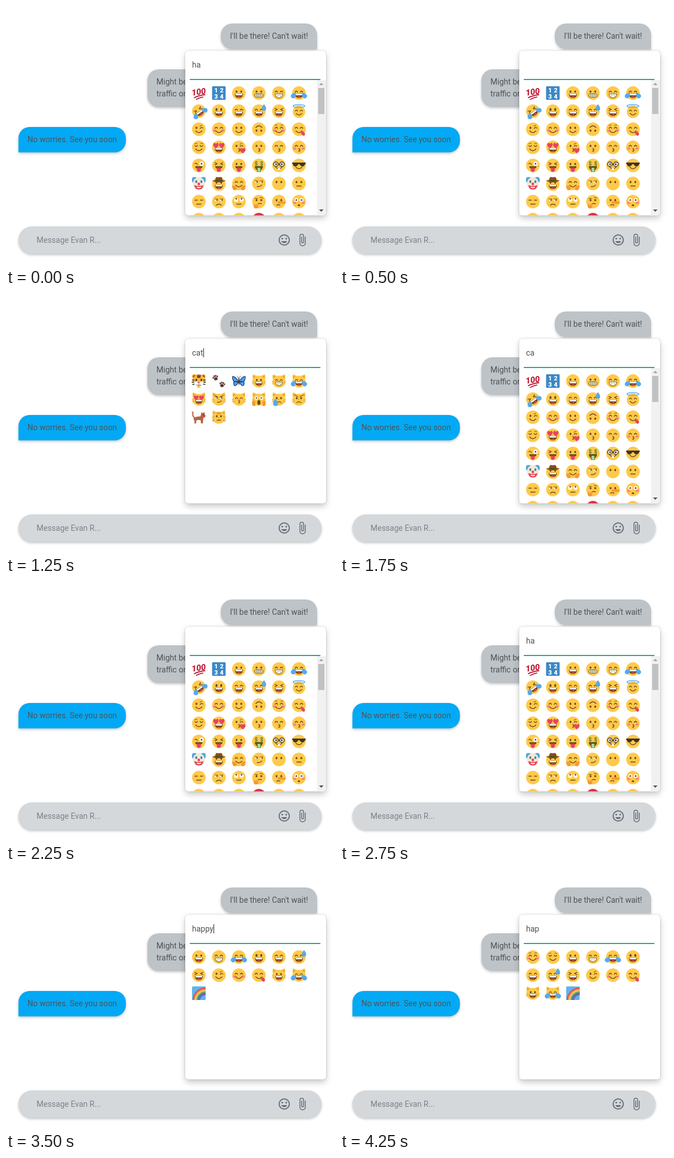
An HTML page that plays this animation: 580 by 460 pixels, repeating every 4500 ms.

```html
<!DOCTYPE html>
<html lang="en">
<head>
<meta charset="utf-8">
<title>Emoji search</title>
<style>
html, body { margin: 0; width: 100%; height: 100%; overflow: hidden; background: #fff; }
svg { display: block; width: 580px; height: 460px; font: 14px Roboto, sans-serif; }
.bubble { filter: drop-shadow(0 2px 2px rgba(0,0,0,.24)); }
.panel { filter: drop-shadow(0 5px 6px rgba(0,0,0,.19)) drop-shadow(0 0 1px rgba(0,0,0,.22)); }
</style>
</head>
<body>
<svg viewBox="0 0 580 460">
  <defs>
    <clipPath id="list"><path d="M317 131H566V365a5.500 5.500 0 0 1-5.500 5.500H322.500a5.500 5.500 0 0 1-5.500-5.500z"/></clipPath>
    <clipPath id="tile"><rect x="-12" y="-12" width="24" height="24" rx="1.500"/></clipPath>
    <clipPath id="disc"><circle r="12"/></clipPath>
  </defs>
  <g fill="#bdc3c7">
    <path class="bubble" d="M400 31H530a20 20 0 0 1 20 20V76H400a20 20 0 0 1-20-20V51a20 20 0 0 1 20-20z"/>
    <path class="bubble" d="M270 112H530a20 20 0 0 1 20 20V178.500H270a20 20 0 0 1-20-20V132a20 20 0 0 1 20-20z"/>
    <path class="bubble" fill="#03a9f4" d="M42 214H192a20 20 0 0 1 20 20V239a20 20 0 0 1-20 20H22V234a20 20 0 0 1 20-20z"/>
    <rect class="bubble" x="22" y="390" width="536" height="48.500" rx="24.250" fill="#d4d8db"/>
  </g>
  <g fill="#505356">
    <text x="396" y="58">I'll be there! Can't wait!</text>
    <text x="266" y="139">Might be</text>
    <text x="266" y="160">traffic on</text>
    <text x="38" y="241">No worries. See you soon</text>
    <text x="54" y="419" fill="#7e8286">Message Evan R...</text>
  </g>
  <g fill="#69707a">
    <circle cx="492" cy="414" r="9" fill="none" stroke="#69707a" stroke-width="2"/>
    <circle cx="488.500" cy="411.500" r="1.500"/>
    <circle cx="495.500" cy="411.500" r="1.500"/>
    <path d="M486.900 416h10.200c-.8 2.040-2.780 3.500-5.100 3.500s-4.300-1.460-5.100-3.500z"/>
    <path transform="translate(512 402)" fill="none" stroke="#69707a" stroke-width="1.500"
      d="M17.250 6V17.500a4.750 4.750 0 0 1-9.500 0V5a3.250 3.250 0 0 1 6.500 0V15.500a1.750 1.750 0 0 1-3.500 0V6"/>
  </g>
  <rect class="panel" x="317" y="79" width="249" height="291.500" rx="5.500" fill="#fff"/>
  <path d="M325 130H556" stroke="#26a69a" stroke-width="2"/>
  <text id="query" x="329" y="109" fill="#505050"></text>
  <path id="caret" stroke="#222" d="M0 96V112"/>
  <g id="results" clip-path="url(#list)"></g>
  <g id="bar" clip-path="url(#list)">
    <path fill="#f1f1f1" d="M550 131h16V371h-16z"/>
    <path fill="#c1c1c1" d="M552 145h11V191h-11z"/>
    <path fill="#a3a3a3" d="M553.500 140h8l-4-4z"/>
    <path fill="#505050" d="M553.500 360h8l-4 4z"/>
  </g>
</svg>
<script>
const YEL = '#ffc94a', BRN = '#6b4a17', RED = '#e8455f', PINK = '#ff7f87',
      BLUE = '#55a9ee', ORG = '#f39a2d', WHT = '#fff', DARK = '#3b3430';

// Drawing helpers; every emoji is centred on 0,0 with radius 12.
const fill = (d, c = BRN) => `<path d="${d}" fill="${c}"/>`;
const line = (d, c = BRN, w = 1.4) =>
  `<path d="${d}" fill="none" stroke="${c}" stroke-width="${w}" stroke-linecap="round" stroke-linejoin="round"/>`;
const oval = (x, y, rx, ry = rx, c = BRN) => `<ellipse cx="${x}" cy="${y}" rx="${rx}" ry="${ry}" fill="${c}"/>`;
const pair = (x, y, rx, ry, c) => oval(-x, y, rx, ry, c) + oval(x, y, rx, ry, c);
const move = (t, s) => `<g transform="${t}">${s}</g>`;
const mirror = s => s + move('scale(-1 1)', s);
const heart = (x, y, k, c = RED) =>
  move(`translate(${x} ${y}) scale(${k})`, fill('M0 4C-6 0-4-4-2-4Q-.5-4 0-2.500Q.5-4 2-4C4-4 6 0 0 4z', c));
const drop = (x, y, r, k = 1) =>
  move(`translate(${x} ${y}) rotate(${r}) scale(${k})`, fill('M0-5C2-2 3.500 0 3.500 2a3.500 3.500 0 0 1-7 0C-3.500 0-2-2 0-5z', BLUE));
const label = (x, y, size, s, c, extra = '') =>
  `<text x="${x}" y="${y}" font-size="${size}" font-weight="900" text-anchor="middle" fill="${c}" ${extra}>${s}</text>`;

const eyes = {
  dot: pair(4.2, -2.5, 1.6, 2.1),
  arc: mirror(line('M2.300-1.500Q4.600-5.500 6.900-1.500')),
  shut: mirror(line('M2.300-3Q4.600 0 6.900-3')),
  squint: mirror(line('M7-4.800L3-2.800L7-.8')),
  flat: mirror(line('M2.500-2.500H7')),
  wink: oval(-4.2, -2.5, 1.6, 2.1) + line('M2.300-1.500Q4.600-4.500 7-2') + line('M2-5.500L5.500-7', BRN, 1),
  heart: heart(-5.2, -3, 1.2) + heart(5.2, -3, 1.2),
  side: pair(4.5, -2.5, 2.6, 1.7, WHT) + oval(-3.3, -2.4, 1.3) + oval(5.7, -2.4, 1.3) + mirror(line('M2-4.500H7', BRN, 1.1)),
  wide: pair(4.7, -2.8, 3.3, 3.3, WHT) + pair(4.7, -2.8, 1.5, 1.5)
};
const open = fill('M-7.200 1.200H7.200C7.200 6 4 9 0 9S-7.200 6-7.200 1.200z');
const teeth = fill('M-6.300 1.500H6.300L5.600 4H-5.600z', WHT);
const mouth = {
  open: open + teeth + oval(0, 7.300, 3.300, 1.500, RED),
  teeth: open + fill('M-6.200 2H6.200C6 5.500 3.500 8 0 8S-6 5.500-6.200 2z', WHT) + line('M-6 4.700H6M-3 2V7M0 2V8M3 2V7', '#b8a98e', .5),
  smile: line('M-5.500 3Q0 9 5.500 3'),
  grimace: '<rect x="-7.500" y="1.500" width="15" height="5.600" rx="2.300" fill="#fff" stroke="#6b4a17"/>' + line('M-7 4.300H7M-3.500 2V7M0 2V7M3.500 2V7', BRN, .6),
  kiss: line('M-1 2C3 2 2 4.500 0 4.500C3 4.500 2 7.500-1 7', BRN, 1.2),
  flat: line('M-4 4.500H4'),
  smirk: line('M-3 5.500Q3 6 5 2.500'),
  frown: line('M-4.500 6.500Q0 2.500 4.500 6.500'),
  tongue: fill('M-6.500 1.500H6.500Q6 6.500 0 6.500T-6.500 1.500z') + fill('M-3.500 4H3.500V8a3.500 3.500 0 0 1-7 0z', RED) + line('M0 5V7.500', '#b92c48', .7)
};
const blush = pair(7.5, 2.3, 2.8, 2, PINK);
const tears = drop(-8.8, 3.5, 38, 1.15) + drop(8.8, 3.5, -38, 1.15);
const face = (e, m, extra = '', under = '') => oval(0, 0, 12, 12, YEL) + under + (eyes[e] || '') + (mouth[m] || '') + extra;

const whiskers = mirror(line('M8.500 2L12 1M8.500 4.500L12 5', '#d98e24', .7));
const cat = (e, m, extra = '') =>
  mirror(fill('M3-9L10.500-12Q12.500-6 10-2z', YEL) + fill('M6-8L9.700-9.800Q10.500-7 9.500-4.500z', '#e59a31')) +
  oval(0, 1, 11.6, 10.6, YEL) + whiskers + move('translate(0 .5) scale(.9)', (eyes[e] || '') + (mouth[m] || '')) +
  fill('M-1.400.2H1.400L0 1.700z', '#d2695c') + extra;
const paw = oval(0, 2, 3, 2.6, '#5b3331') + pair(1.4, -2.7, 1.2, 1.8, '#5b3331') + pair(3.7, -.9, 1.1, 1.6, '#5b3331');

const art = {
  hundred: move('rotate(-8)', label(0, 3, 15, '100', '#c2203c', 'font-style="italic" textLength="0"'.slice(0, 19)) +
    line('M-9 7Q0 4 10 4.500M-6 10.500Q0 8 6 8', '#c2203c', 1.9)),
  digits: '<rect x="-12" y="-12" width="24" height="24" rx="1.500" fill="#3b88c6"/>' +
    label(-5, -1.5, 11, 1, WHT) + label(5, -1.5, 11, 2, WHT) + label(-5, 9.5, 11, 3, WHT) + label(5, 9.5, 11, 4, WHT),
  grinning: face('dot', 'open'),
  grimacing: face('dot', 'grimace'),
  grin: face('arc', 'teeth'),
  joy: face('arc', 'open', tears),
  rofl: move('rotate(-35)', face('squint', 'open', tears)),
  smiley: face('dot', 'open', pair(4.2, -3, 1.7, 2.5)),
  smile: face('arc', 'open'),
  sweat: face('arc', 'open', drop(9, -7, 0, 1.1)),
  laughing: face('squint', 'open'),
  angel: move('translate(0 1.300) scale(.92)', face('arc', 'smile')) +
    `<ellipse cy="-9" rx="10.500" ry="2.300" fill="none" stroke="${BLUE}" stroke-width="1.500"/>`,
  wink: face('wink', 'smile'),
  blush: face('arc', 'smile', '', blush),
  slight: face('dot', 'smile'),
  upside: move('rotate(180)', face('dot', 'smile')),
  relaxed: face('arc', 'smile', mirror(line('M3-7Q5-8.500 7-7', BRN, .9)), blush),
  yum: face('arc', 'smile', fill('M3 6.500L7 3.500Q12 7 10.500 10T5.500 10z', RED)),
  relieved: face('shut', 'smile', mirror(line('M3-6.500Q5-8 7-6.500', BRN, .9))),
  hearts: face('heart', 'open'),
  kissHeart: face('wink', 'kiss', heart(7, 6, 1.2)),
  kissing: face('dot', 'kiss'),
  kissSmile: face('arc', 'kiss'),
  kissShut: face('arc', 'kiss', '', blush),
  winkTongue: face('', 'tongue', line('M-7-3Q-4.500-5-2.300-1.500') + oval(4.8, -3, 3.7, 3.7, WHT) + oval(4.8, -3, 1.6)),
  shutTongue: face('squint', 'tongue'),
  tongue: face('dot', 'tongue'),
  money: face('', '', open + fill('M-3.500 4H3.500V11.500H-3.500z', '#56a844') + label(0, 10, 7, '$', WHT) +
    label(-4.8, 0, 9, '$', '#37803a') + label(4.8, 0, 9, '$', '#37803a')),
  nerd: face('', 'smile', fill('M-2 5H2V8H-2z', WHT) + mirror(`<circle cx="5.300" cy="-2" r="4" fill="#fff" stroke="${DARK}" stroke-width="1.500"/>`) +
    pair(5, -2, 1.6, 1.9) + line('M-1.300-2H1.300', DARK)),
  cool: face('', 'smile', fill('M-12-5H12V-3L10.500-2C10 3 3 3 1.500-2H-1.500C-3 3-10 3-10.500-2L-12-3z', DARK)),
  clown: mirror(fill('M4-11Q12-13 12-8Q13-2 9-1z', '#4aa6de')) + oval(0, .5, 10.5, 11.5, '#f8e5d4') +
    pair(4.5, -3.5, 2, 2.8, '#75c6e8') + pair(4.5, -3, 1.2, 1.7) + oval(0, .8, 2.4, 2.4, RED) +
    fill('M-8 3Q0 6 8 3Q7 10.500 0 10.500T-8 3z', '#d9354f') + fill('M-5 5.500Q0 7 5 5.500Q3 8.500 0 8.500T-5 5.500z', WHT),
  cowboy: move('translate(0 1)', face('dot', 'open')) + fill('M-12-6Q-7-4-6-7Q-6-12-3-11.500Q0-10.500 3-11.500Q6-12 6-7Q7-4 12-6Q10-2 0-2T-12-6z', '#805025') +
    line('M-6-5.500Q0-4 6-5.500', '#4e2d18', 1.1),
  hug: face('arc', 'smile') + mirror(fill('M4 11Q3 7 5.500 6L7 3.500Q9 3 8.800 5L11 3Q13 4 11.500 7Q11 12 7 12z', ORG)),
  smirk: face('side', 'smirk'),
  mute: face('dot', ''),
  neutral: face('dot', 'flat'),
  blank: face('flat', 'flat'),
  unamused: face('side', 'frown'),
  roll: face('', 'flat', pair(4.7, -3, 3.5, 3.5, WHT) + pair(4.7, -5, 1.5, 1.5)),
  think: face('dot', '', line('M-1.500 4Q2 2.500 4.500 4') + line('M2-7Q5-8.500 7-6M-7-5.500H-2.500', BRN, 1) +
    fill('M-9 4L-7 6L0 3.500Q2 4.500 0 5.500L-3 7Q0 8-1 10Q-3 13-7 12Q-10 11-9 4z', ORG)),
  lie: face('dot', '', line('M-4 6.500Q-1 4.500 2 6.500') + fill('M-1-.5Q6-1 11 .3Q13 2 11 3.500Q5 4-1 3.500Q-3 1.500-1-.5z', ORG)),
  flushed: face('wide', '', oval(0, 6.5, 2.3, 1.5), blush),
  plain: oval(0, 0, 12, 12, YEL),
  rage: oval(0, 0, 12, 12, '#dc2f45'),
  tiger: mirror(oval(8, -8, 4, 4, '#f5a72f') + oval(8, -8, 2, 2, DARK)) + oval(0, 0, 11.5, 11.7, '#fbb53b') +
    pair(5.5, 6, 5.3, 5, WHT) + mirror(line('M11.500-2L8-1.500M12 2L8.500 2M11 6L8 5.500M2.500-10.500L2-7.500', DARK, 1.5)) +
    line('M0-11V-6M-2.500-7H2.500', DARK) + pair(4.4, -2, 1.5, 1.9, DARK) + fill('M-2.500 2H2.500L0 5z', '#d26a61') + line('M-4 7Q-1 9 0 6Q1 9 4 7', DARK, 1),
  paws: move('translate(-6 -6) rotate(-18) scale(1.050)', paw) + move('translate(6 6) rotate(12) scale(1.050)', paw),
  butterfly: mirror(fill('M.5 0C3-5 7-9 11.500-9Q13-4 9.500 1Q11 7 7.500 9Q3 9 .5 2z', '#27528f') +
    fill('M2 0Q6-6 10.500-7.500Q11-3 8 0zM2.500 2.500L8 2Q9 6 7 7.500Q4 7 2.500 2.500z', '#53a7e3') + line('M.5-4Q1-8 3-9', DARK, .8)) + oval(0, 1, 1.1, 6, DARK),
  catOpen: cat('dot', 'open'),
  catGrin: cat('arc', 'teeth'),
  catJoy: cat('arc', 'open', tears),
  catLove: cat('heart', 'open'),
  catSmirk: cat('side', 'smirk', mirror(line('M2.500-4L7-6.500', BRN, 1.1))),
  catKiss: cat('arc', 'kiss'),
  catScream: cat('wide', '', oval(0, 6, 2.8, 4.2) + mirror(fill('M6 12L6.500 4Q8 1.500 9 4Q10.500 2 11.500 4Q13 6 11 12z', ORG))),
  catCry: cat('dot', 'frown', drop(-6, 5.5, 0, 1.25)),
  catPout: cat('dot', 'frown', mirror(line('M2-4.500L7-7', BRN, 1.1))),
  catWalk: line('M-7 1Q-12-2-10.500-7Q-10-9-11.500-9', '#b9623f', 2) +
    fill('M-9 1Q-4-2 3-1.500L4.500-9L7-7L9.500-9.500L10.500-5L12-2Q11 1 8 1L7 11H4L3 5H-4L-5 11H-8L-7.500 6Q-10 5-9 1z', '#b9623f') +
    oval(8.2, -4, .8, .9, DARK),
  catFace: cat('dot', '', line('M-3.500 5Q-1 7 0 4Q1 7 3.500 5', BRN, 1.1) + line('M0-9V-5M-3-8.500L-2.500-6M3-8.500L2.500-6', '#d67c2c', 1.3) +
    mirror(line('M11-2L8-1.500M11.500 7L8 6', '#d67c2c', 1.1))),
  rainbow: '<g clip-path="url(#tile)"><rect x="-12" y="-12" width="24" height="24" fill="#5fb4ee"/>' +
    ['#e34a50', '#f4913c', '#fbd24b', '#6fb84c', '#4273cc', '#8755b8']
      .map((c, i) => `<circle cx="12" cy="13" r="${22 - i * 2.2}" fill="none" stroke="${c}" stroke-width="2.300"/>`).join('') + '</g>'
};

const happy = 'grinning grin joy smiley smile sweat laughing wink blush yum catOpen catJoy rainbow';
const lists = {
  all: 'hundred digits grinning grimacing grin joy rofl smiley smile sweat laughing angel ' +
    'wink blush slight upside relaxed yum relieved hearts kissHeart kissing kissSmile kissShut ' +
    'winkTongue shutTongue tongue money nerd cool clown cowboy hug smirk mute neutral ' +
    'blank unamused roll think lie flushed plain plain plain rage plain plain',
  cat: 'tiger paws butterfly catOpen catGrin catJoy catLove catSmirk catKiss catScream catCry catPout catWalk catFace',
  hap: 'relaxed relieved ' + happy,
  happ: 'relaxed relieved ' + happy,
  happy
};
const grid = names => names.split(' ').map((n, i) =>
  move(`translate(${341 + i % 6 * 35.4} ${154 + Math.floor(i / 6) * 32})`, art[n])).join('');

const STEP = 250;
const hold = { cat: 2, happy: 2 };
const caretX = { cat: 349.5, happy: 367.5 };
const timeline = ['ha', 'h', '', 'c', 'ca', 'cat', 'ca', 'c', '', 'h', 'ha', 'hap', 'happ', 'happy', 'happ', 'hap']
  .flatMap(q => Array(hold[q] || 1).fill(q));

const $ = id => document.getElementById(id);
let shown = null;

function draw(ms) {
  const q = timeline[Math.floor(ms / STEP) % timeline.length];
  if (q === shown) return;
  shown = q;
  $('query').textContent = q;
  $('results').innerHTML = grid(lists[q] || lists.all);
  $('bar').style.display = lists[q] ? 'none' : '';
  $('caret').style.display = caretX[q] ? '' : 'none';
  $('caret').setAttribute('transform', `translate(${caretX[q] || 0})`);
}

const start = performance.now();
function tick() {
  draw(performance.now() - start);
  requestAnimationFrame(tick);
}
tick();
</script>
</body>
</html>
```
